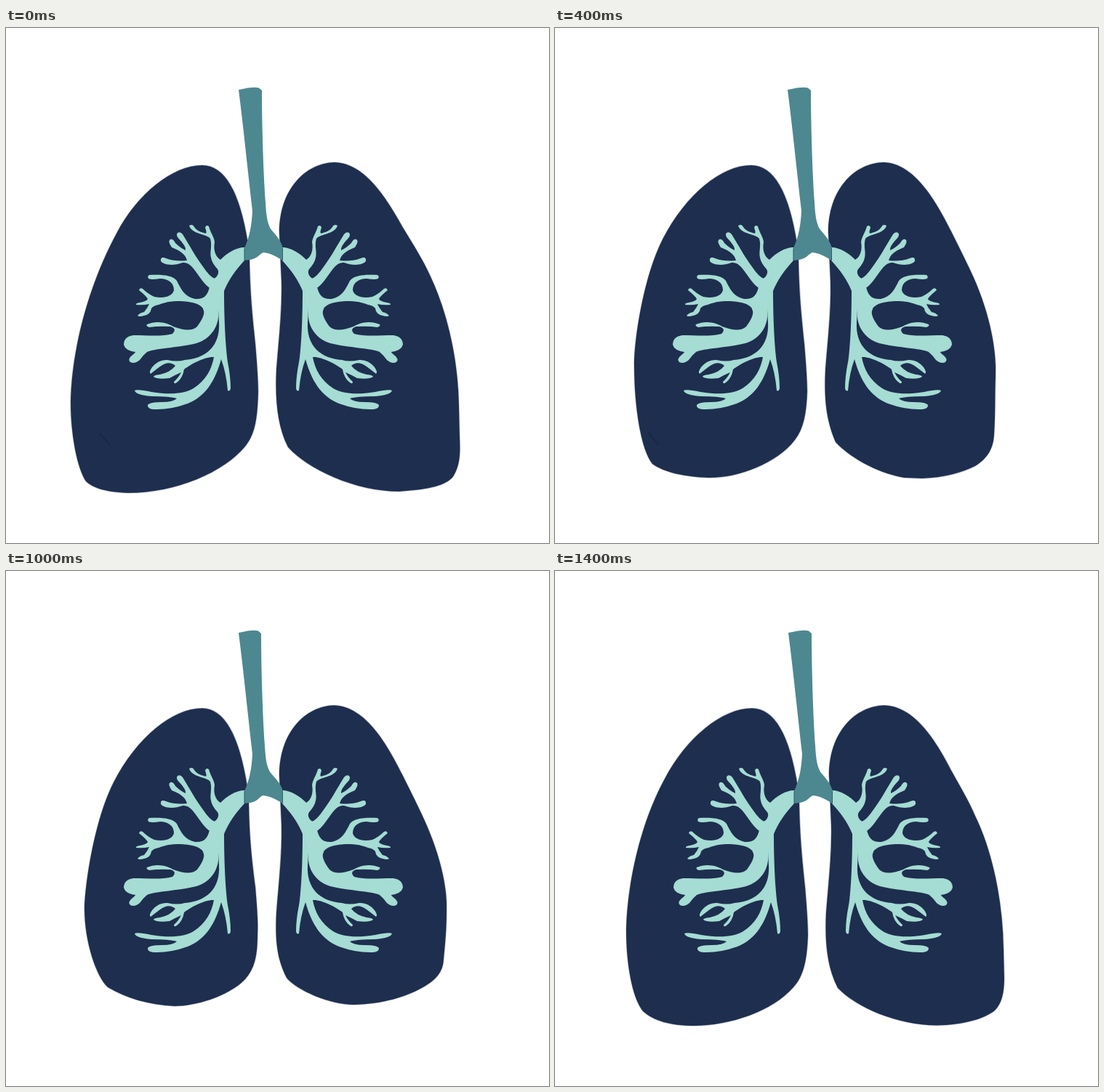
Write an HTML page that moves like this. It is 747 px wide and 709 px high and loops after 1.6 s.

```html
<!DOCTYPE html>
<html lang="en">
<head>
<meta charset="utf-8">
<title>Breathing lungs</title>
<style>
  html, body { margin: 0; width: 100%; height: 100%; overflow: hidden; background: #fff; }
  svg { display: block; width: 747px; height: 709px; }
  .lung { fill: #1e2e4f; stroke: #1e2e4f; stroke-width: 1.4; stroke-opacity: .3; }
  .airway { fill: #4d8890; }
  .seam { stroke: #2f5f6c; stroke-width: 1; }
  .crease { stroke: #1a2845; stroke-width: 2; stroke-linecap: round; }
  #tree { fill: #a5dcd3; }

  /* Eight held poses, 200 ms each: breathe out, then back in */
  .body, .lung, .airway, .crease { animation: 1.6s step-end infinite; }
  .body { animation-name: nudge; }
  .left { animation-name: left; }
  .right { animation-name: right; }
  .airway { animation-name: airway; }
  .crease { animation-name: crease; }

  @keyframes nudge {
    0% { transform: none; }
    75%, 100% { transform: translateX(1px); }
  }
  @keyframes crease {
    0%, 25% { opacity: 1; }
    12.5%, 37.5%, 100% { opacity: 0; }
  }
  @keyframes airway {
    0%, 75%, 100% { d: path("M320,85 Q341,80 348,82.5 L352,86 C352,130 354,200 357,240 C358,260 360,272 366,279 C374,288 378,293 381,303 L380,320 C372,314 363,310 354,309 C349,311 345,318 336,319 L328,320 V303 C336,285 338,270 339,252 C333,200 327,140 320,85Z"); }
    37.5% { d: path("M320,85 Q340,80 347,82.5 L351,86 C351,130 353,200 356,240 C357,260 359,272 365,279 C373,288 378,293 381,303 L380,320 C372,314 363,310 353,309 C349,311 345,318 336,319 L328,320 V303 C336,285 338,270 339,252 C333,200 327,140 320,85Z"); }
  }
  @keyframes left {
    0%, 100% { d: path("M270,189 C301,189 322,226 333,297 L335,320 C336,370 339,395 343,435 C346,470 347,490 347,500 C346,540 342,560 329,576 C300,611 235,640 168,640 C135,639 118,632 110,624 C98,606 89,560 89,515 C90,445 113,355 152,283 C180,229 229,189 270,189Z"); }
    12.5%, 87.5% { d: path("M270,189 C301,189 322,226 333,297 L335,320 C336,370 339,395 343,435 C346,470 347,490 347,500 C346,535 341,558 327,573 C298,606 240,626 190,626 C158,626 134,619 120,606 C105,587 97,540 97,495 C98,435 115,350 150,286 C180,229 229,189 270,189Z"); }
    25% { d: path("M270,189 C301,189 322,226 333,297 L335,320 C336,370 339,395 343,435 C346,470 347,490 347,500 C346,530 342,552 330,567 C305,600 250,620 211,619 C180,618 150,612 134,600 C118,580 109,520 109,465 C109,430 121,345 148,291 C180,229 229,189 270,189Z"); }
    37.5%, 62.5% { d: path("M270,189 C300,189 321,226 332,297 L334,320 C335,370 338,395 343,435 C346,470 347,490 346,500 C346,530 342,548 328,563 C305,586 260,599 232,599 C195,597 165,588 140,573 C124,558 108,510 108,465 C109,430 121,345 148,291 C180,229 229,189 270,189Z"); }
    50% { d: path("M270,189 C299,189 319,222 331,297 L334,320 C335,370 338,395 342,435 C345,470 346,490 346,500 C345,527 340,542 326,554 C305,573 270,581 232,581 C195,576 158,567 133,546 C118,530 113,495 113.5,470 C114,435 123,405 132,374 C138,345 148,310 158,290 C168,266 178,246 190,234 C200,225 205,218 215,213 C235,198 254,189 270,189Z"); }
    75% { d: path("M270,189 C301,189 322,226 333,297 L335,320 C336,370 339,395 343,435 C346,470 347,490 347,500 C346,530 342,552 329,567 C305,600 250,620 210,619 C180,618 150,612 133,600 C115,582 109,530 109,488 C110,430 121,348 148,291 C180,229 229,189 270,189Z"); }
  }
  @keyframes right {
    0%, 100% { d: path("M452,185 C412,186 376,222 376,282 L377,305 L379,350 C380,390 375,430 372,470 C370,510 373,548 388,577 C415,607 480,638 541,638 L563,636 C595,632 610,626 616,616 C625,600 625,585 624,562 L623,520 C622,460 609,395 583,340 C573,318 560,298 548,278 C525,237 495,186 452,185Z"); }
    12.5%, 87.5% { d: path("M452,185 C412,186 376,222 376,282 L377,305 L379,350 C380,390 375,430 372,470 C370,510 373,545 388,574 C414,601 469,625 524,625.5 C559,625 589,617 604,605 C614,595 617,580 617,560 L616,520 C615,455 601,385 576,335 C569,318 557,298 546,278 C525,237 495,186 452,185Z"); }
    25% { d: path("M452,185 C412,186 376,222 376,282 L377,305 L379,350 C380,390 375,430 372,470 C370,510 373,540 386,570 C402,588 440,612 480,619 L505,620 C535,619 560,612 578,603 C596,592 603,578 604,560 C606,530 605,510 606,480 C608,440 596,385 571,333 C563,316 556,302 545,280 C525,240 495,186 452,185Z"); }
    37.5%, 62.5% { d: path("M451,185 C412,186 376,222 376,282 L377,305 L379,350 C380,390 375,430 372,470 C370,510 373,534 386,560 C400,577 445,597 478,597 C520,596 550,586 572,574 C592,563 601,552 602,535 C605,505 606,490 606,470 C608,435 596,385 571,333 C563,316 556,302 545,280 C525,240 495,186 451,185Z"); }
    50% { d: path("M450,185 C430,186 410,197 397,209 C381,225 374,250 374,285 L375,305 L377,350 C378,390 374,430 372,470 C370,510 374,528 386,550 C393,555 405,566 420,573 C440,579 460,582 478,583 C500,580 525,574 545,565 C560,557 572,549 581,540 C596,524 603,512 603,488 C602,455 600,425 594,404 C588,385 580,362 570,340 C560,322 545,297 532,277 C521,257 512,237 500,216 C488,195 472,185 450,185Z"); }
    75% { d: path("M451,185 C412,186 376,222 376,282 L377,305 L379,350 C380,390 375,430 372,470 C370,510 373,540 386,570 C402,588 440,612 479,619 L504,620 C534,619 559,612 577,603 C595,592 602,578 603,560 C605,530 604,515 605,490 C606,440 593,378 570,331 C563,316 556,302 545,280 C525,240 495,186 451,185Z"); }
  }
</style>
</head>
<body>
<svg viewBox="0 0 747 709">
  <defs>
    <g id="tree">
      <path d="M252,272 Q257,269 259,274 Q263,280 272,282 Q278,285 274,275 Q275,270 279,273 C281,281 287,289 287,295 C285,305 288,315 295,319 C304,310 316,302 328,302 V320 C316,333 306,347 300,362 L276,372 Q281,362 280,356 L286,345 C291,343 294,336 291,332 Q283,323 282,316 C280,308 284,300 281,290 C278,284 255,284 252,272Z"/>
      <path d="M236,282 Q240,280 243,284 C253,300 260,314 272,330 Q280,342 287,345 L294,345 L290,362 L279,357 C270,350 264,338 256,329 Q250,322 243,323 C230,328 216,326 213,321 Q212,314 220,317 C230,321 240,321 249,320 C247,313 243,308 228,302 Q222,293 226,291 Q230,290 233,296 Q240,303 247,306 C248,300 240,293 236,288 Q234,284 236,282Z"/>
      <path d="M197,340 C217,339 230,341 235,348 C241,360 246,370 260,373 C272,374 278,368 280,356 L300,362 L290,395 L272,388 C268,378 250,376 235,376 C222,376 213,380 210,381 Q203,382 200,386 Q199,394 190,396 Q183,398 181,396 Q184,392 190,391 Q195,385 197,380 Q188,382 179,381 Q178,379 184,378 Q194,376 195,373 Q193,369 183,361 Q184,357 188,359 Q195,366 204,370 C218,373 229,369 231,361 C231,350 222,345 212,345 Q200,347 196,345 Q194,342 197,340Z"/>
      <path d="M300,362 L292,390 C294,410 282,428 262,434 C238,440 205,441 194,446 Q188,451 184,457 Q177,463 171,460 Q167,456 173,451 Q178,447 178,446 Q164,444 162,436 Q162,425 175,423 C195,423 215,425 229,421 Q236,414 226,411 Q210,410 197,412 Q192,410 194,408 C208,402 222,406 230,411 C243,416 256,418 263,411 C269,403 275,393 271,387 L280,370Z"/>
      <path d="M300,361 C300,400 302,440 305,460 Q309,480 309,496 Q308,501 305,499 Q303,475 296,456 C288,485 275,507 250,517 Q225,526 203,525 Q194,524 195,519 Q198,515 215,515 Q230,515 235,510 Q225,507 200,507 Q178,505 177,499 Q181,497 200,501 C225,505 245,504 258,496 C275,485 283,470 286,453 C275,452 255,462 245,470 Q243,482 235,488 Q231,491 231,487 Q237,482 241,474 Q232,478 225,482 Q208,484 203,480 Q203,478 212,477 Q226,474 233,465 Q224,457 212,466 Q204,472 199,476 Q196,474 201,467 Q210,456 222,457 Q236,460 246,457 C275,455 295,438 293,405 L292,388Z"/>
    </g>
  </defs>
  <g class="body">
    <path class="lung left"/>
    <path class="lung right"/>
    <path class="crease" d="M129,558 L142,573"/>
    <use href="#tree"/>
    <use href="#tree" transform="translate(708) scale(-1 1)"/>
    <path class="airway"/>
    <path class="seam" d="M328,303 V320 M380.5,303 V320"/>
  </g>
</svg>
</body>
</html>
```
